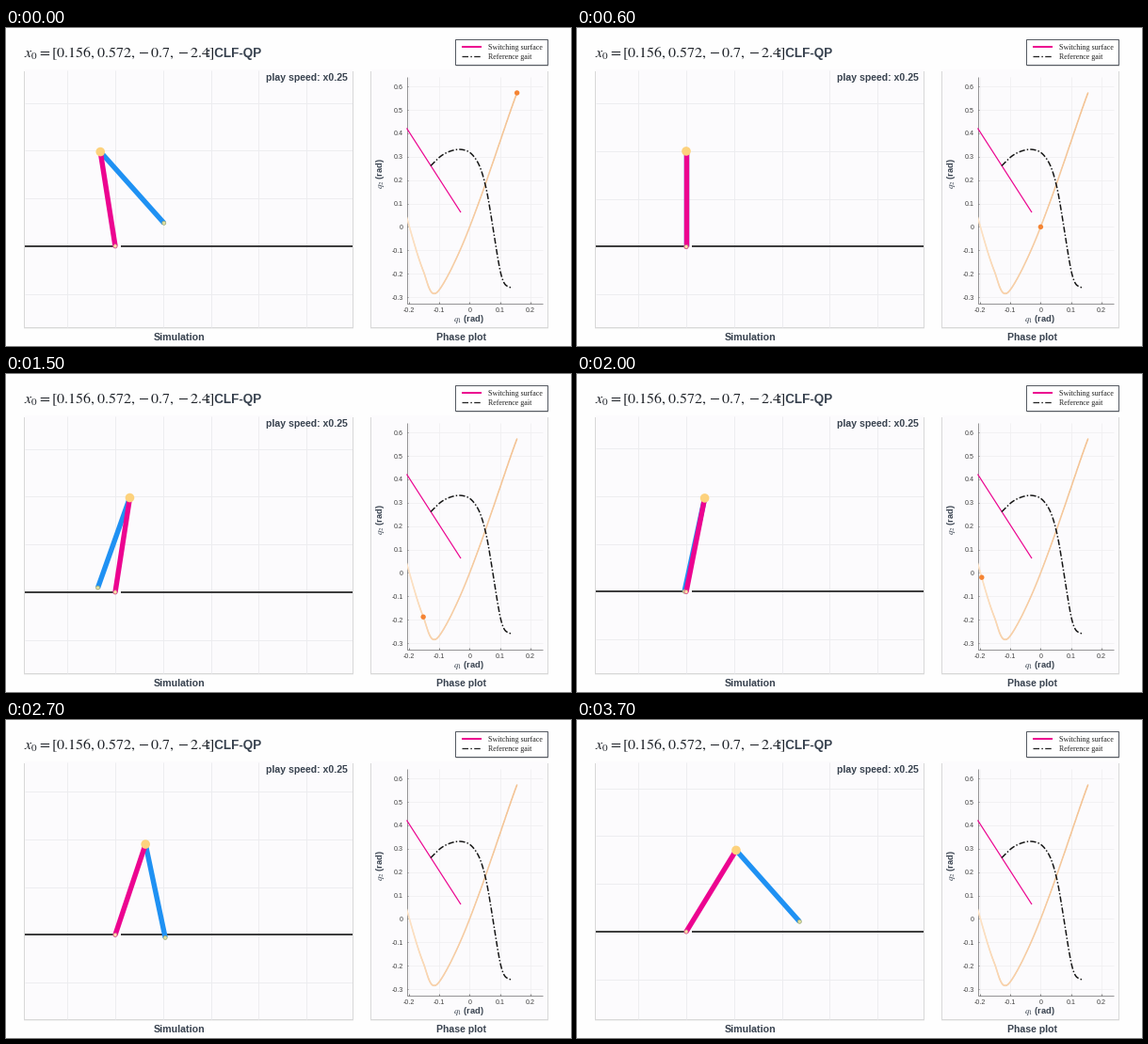
A matplotlib script that plays this animation: 600 by 338 pixels, repeating every 3800 ms.

```python
import numpy as np
import matplotlib.pyplot as plt
from matplotlib.animation import FuncAnimation
from matplotlib.collections import LineCollection
from matplotlib.patches import Circle, Rectangle

W, H, DPI = 600, 338, 100
PT = 72 / DPI
FRAMES, INTERVAL = 38, 100
PINK, BLUE, YELLOW, ORANGE = "#ec0490", "#1f91f3", "#fdd27d", "#f58433"
INK, PAGE, PANEL = "#38424f", "#fefefe", "#fcfbfd"
LEG, FOOT_X, VIEW_Y = 101.5, 116, 181.7

plt.rcParams["mathtext.fontset"] = "stix"


def hermite(t, knots, values, slopes):
    """Cubic curve through the knots with the given slopes."""
    knots, values, slopes = map(np.asarray, (knots, values, slopes))
    i = np.clip(np.searchsorted(knots, t, side="right") - 1, 0, len(knots) - 2)
    h = knots[i + 1] - knots[i]
    s = (t - knots[i]) / h
    rise = s * s * (3 - 2 * s)
    return (values[i] * (1 - rise) + values[i + 1] * rise
            + h * s * (1 - s) ** 2 * slopes[i] - h * s * s * (1 - s) * slopes[i + 1])


# Joint angles (rad) and rates (rad per frame) at a few moments of the step.
KNOTS = [0, 6, 10, 15, 24, 30, 37]
Q1 = [.156, 0, -.103, -.153, -.249, -.405, -.549]
Q2 = [.572, 0, -.273, -.188, .22, .871, 1.275]
DQ1 = [-.0175, -.03, -.016, -.009, -.019, -.025, -.018]
DQ2 = [-.06, -.1, -.025, .03, .08, .1, .04]


def joints(t):
    return hermite(t, KNOTS, Q1, DQ1), hermite(t, KNOTS, Q2, DQ2)


def to_phase(q1, q2):
    return 492.4 + 322 * q1, 211.4 - 249 * q2


fig = plt.figure(figsize=(W / DPI, H / DPI), dpi=DPI, facecolor=PAGE)
ax = fig.add_axes([0, 0, 1, 1])
ax.set(xlim=(0, W), ylim=(H, 0))
ax.axis("off")


def line(xs, ys, color, width, z=2, **kw):
    kw.setdefault("solid_capstyle", "butt")
    return ax.plot(xs, ys, color=color, lw=width * PT, zorder=z, **kw)[0]


def box(x0, y0, x1, y1, color, z=0, edge="none", width=0, **kw):
    patch = Rectangle((x0, y0), x1 - x0, y1 - y0, fc=color, ec=edge,
                      lw=width * PT, zorder=z, **kw)
    return ax.add_patch(patch)


def dot(radius, color, z, **kw):
    return ax.add_patch(Circle((0, 0), radius, fc=color, zorder=z, **kw))


def label(x, y, text, px, color=INK, font="Liberation Sans", **kw):
    kw.setdefault("va", "baseline")
    return ax.text(x, y, text, fontsize=px * PT, color=color, family=font,
                   zorder=9, **kw)


def panel(x0, x1):
    for grow, alpha in ((2.2, .05), (1.4, .10), (.7, .16)):
        box(x0 - grow / 2, 46, x1 + grow / 2, 317.7 + grow, "black", alpha=alpha)
    box(x0, 44, x1, 317.7, PANEL, .5)
    return Rectangle((x0, 45), x1 - x0, 272.5, transform=ax.transData)


sim_clip = panel(20, 368)
panel(388, 575)

# Headings and captions
label(19, 31, r"$x_0 = [0.156, 0.572, -0.7, -2.4]$", 16, "#20242a")
label(213, 31, ": CLF-QP", 13.5, weight="bold")
label(363, 56.3, "play speed: x0.25", 10.5, weight="bold", ha="right")
label(184, 332.5, "Simulation", 10.6, weight="bold", ha="center")
label(483.5, 331.7, "Phase plot", 10.5, weight="bold", ha="center")

# Legend
box(477.5, 13, 575.5, 40.5, "black", 1, alpha=.15)
box(476.5, 11.5, 574.5, 38.5, "white", 2, edge="#555a62", width=1)
line([484, 505], [20, 20], PINK, 2, 3)
line([484, 505], [30, 30], "#222222", 1.3, 3, ls=(0, (5, 1.8, 1.2, 1.8)))
label(511.5, 22.7, "Switching surface", 8, "#222222", "Liberation Serif")
label(511.5, 32.7, "Reference gait", 8, "#222222", "Liberation Serif")

# Phase plot
LEFT, RIGHT, TOP, BOTTOM = 425.5, 570, 52, 292.5
phase_clip = Rectangle((LEFT, TOP), RIGHT - LEFT, BOTTOM - TOP,
                       transform=ax.transData)
for k in range(-2, 3):
    x, _ = to_phase(k / 10, 0)
    line([x, x], [TOP, BOTTOM], "#f0eff1", .8, 1)
    line([x, x], [BOTTOM - 1.5, BOTTOM], "#555555", .7)
    label(x, 302.5, f"{k / 10:g}", 7.2, "#444444", ha="center")
for k in range(-3, 7):
    _, y = to_phase(0, k / 10)
    line([LEFT, RIGHT], [y, y], "#f0eff1", .8, 1)
    line([LEFT, LEFT + 1.5], [y, y], "#555555", .7)
    label(422, y + 2.6, f"{k / 10:g}", 7.2, "#444444", ha="right")
line([LEFT, LEFT, RIGHT], [TOP, BOTTOM, BOTTOM], "#6a6a6c", .7)
label(491, 312.5, "$q_1$ (rad)", 9.3, weight="bold", ha="center")
label(398, 155, "$q_2$ (rad)", 9.3, weight="bold", ha="center",
      va="center", rotation=90)

# Planned trajectory, paler towards its end
points = np.column_stack(to_phase(*joints(np.linspace(0, 24, 241))))
fade = np.linspace(0, 1, 240)[:, None] ** 1.2
colors = (1 - fade) * np.array([.955, .765, .58]) + fade * np.array([.995, .91, .81])
trail = LineCollection(np.stack([points[:-1], points[1:]], axis=1), colors=colors,
                       linewidths=1.5 * PT, zorder=3, capstyle="round")
ax.add_collection(trail, autolim=False)
trail.set_clip_path(phase_clip)

line([425.5, 483], [106.5, 196], PINK, 1.2, 4)
gait = np.array([(451, 146.5), (462, 136), (473, 130.5), (484, 129.2), (494, 133.5),
                 (503, 147), (510, 171), (516, 205), (522, 243), (526, 263),
                 (530, 272.5), (536, 276)])
u = np.arange(len(gait))
fine = np.linspace(0, u[-1], 200)
line(*[hermite(fine, u, c, np.gradient(c)) for c in gait.T], "#151515", 1.5, 5,
     ls=(0, (4.2, 1.4, 1, 1.4)))
marker = dot(2.7, ORANGE, 6, ec="none")
marker.set_clip_path(phase_clip)

# Walker scene
for k in range(-1, 5):
    x = FOOT_X + k * LEG / 2
    line([x, x], [45, 317.5], "#ececef", .9, 1)
rows = [(k, line([20, 368], [0, 0], "#ececef", .9, 1)) for k in range(-4, 3)]
for _, row in rows:
    row.set_clip_path(sim_clip)
ground = line([20, 368], [0, 0], "#111111", 1.6)
gap = line([118, 122], [0, 0], PANEL, 2.2, 3)
swing_leg = line([], [], BLUE, 5.4, 4)
stance_leg = line([], [], PINK, 5.4, 5)
swing_foot = dot(2, "#dfe0a0", 6, ec="#9aa77c", lw=.5)
stance_foot = dot(2.1, "#fde3a6", 6, ec="#d4508f", lw=.6)
hip_dot = dot(4.8, YELLOW, 7, ec="none")


def update(frame):
    q1, q2 = joints(frame)
    stance_drop = LEG * np.cos(q1)
    swing_drop = LEG * np.cos(q1 + q2)
    # The view stays centred between the hip and the lowest foot.
    hip_x = FOOT_X - LEG * np.sin(q1)
    hip_y = VIEW_Y - max(stance_drop, swing_drop) / 2
    floor = hip_y + stance_drop
    foot_x, foot_y = hip_x + LEG * np.sin(q1 + q2), hip_y + swing_drop

    for k, row in rows:
        row.set_ydata([floor + k * LEG / 2] * 2)
    for part in (ground, gap):
        part.set_ydata([floor, floor])
    stance_leg.set_data([hip_x, FOOT_X], [hip_y, floor])
    swing_leg.set_data([hip_x, foot_x], [hip_y, foot_y])
    hip_dot.center = hip_x, hip_y
    stance_foot.center = FOOT_X, floor
    swing_foot.center = foot_x, foot_y
    marker.center = to_phase(q1, q2)
    return []


anim = FuncAnimation(fig, update, frames=FRAMES, interval=INTERVAL,
                     repeat=True, repeat_delay=0)
plt.show()
```
